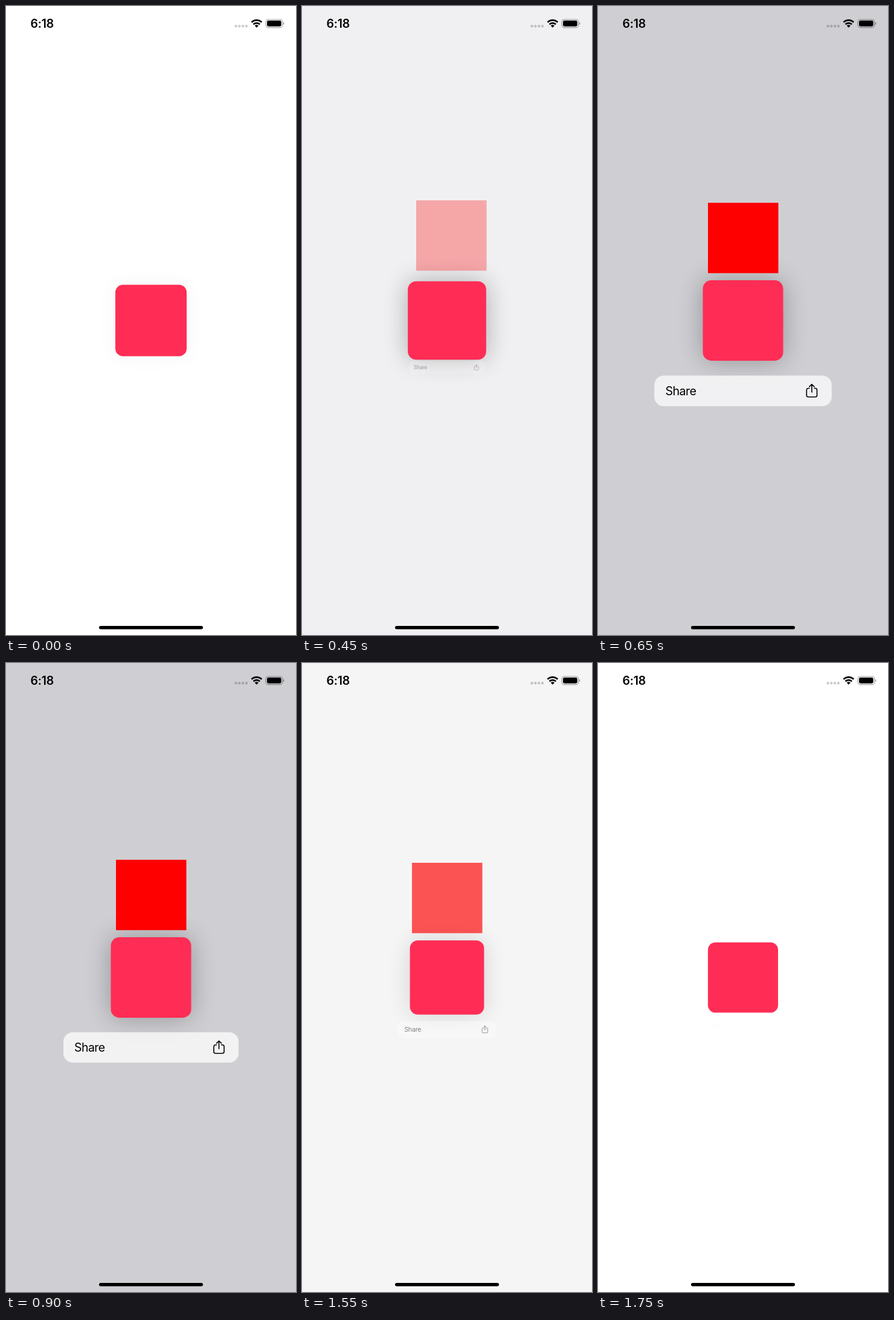
These frames come from a looping animation (480x1039 px, 1900 ms). An HTML page:

```html
<!DOCTYPE html>
<html lang="en">
<head>
<meta charset="utf-8">
<title>Context menu</title>
<style>
  html, body { margin: 0; width: 100%; height: 100%; overflow: hidden; background: #fff; }
  svg { display: block; width: 100%; height: 100%; }
  text { font-family: Inter, Roboto, sans-serif; font-size: 19.5px; }
</style>
</head>
<body>
<svg viewBox="0 0 480 1039">
  <defs>
    <filter id="soft" x="-100%" y="-100%" width="300%" height="300%">
      <feGaussianBlur stdDeviation="18"/>
    </filter>
  </defs>
  <rect width="480" height="1039" fill="#fff"/>
  <rect id="dimmer" width="480" height="1039" fill="#cfcfd3"/>

  <g id="card">
    <rect id="shadow" x="-58" y="-58" width="116" height="116" rx="12.3" filter="url(#soft)"/>
    <rect x="-58" y="-58" width="116" height="116" rx="12.3" fill="#ff2d55"/>
  </g>
  <rect id="preview" x="182" y="325" width="116.5" height="116.3" fill="#f00"/>

  <g id="menu">
    <rect x="-145" y="-25" width="290" height="50" rx="15.5" fill="#fff" fill-opacity=".72"/>
    <text x="-127" y="7" letter-spacing="-.03em">Share</text>
    <g fill="none" stroke="#000" stroke-width="1.6" stroke-linecap="round" stroke-linejoin="round">
      <path d="M108.5-4.2h-1.8a2.7 2.7 0 0 0-2.7 2.7v8.6a2.7 2.7 0 0 0 2.7 2.7h11.6a2.7 2.7 0 0 0 2.7-2.7v-8.6a2.7 2.7 0 0 0-2.7-2.7h-1.8"/>
      <path d="M112.500 2.200v-12.900M108.500-6.800l4-4 4 4"/>
    </g>
  </g>

  <text x="40.600" y="36" font-weight="600" letter-spacing="-.015em">6:18</text>
  <path d="M380.500 33.200h18" stroke="#000" stroke-opacity=".2" stroke-width="4.500" stroke-linecap="round" stroke-dasharray="0 5.800"/>
  <g fill="none" stroke="#000" stroke-width="2.700">
    <path d="M406.400 26.800a12 12 0 0 1 16.800 0"/>
    <path d="M409.500 30.300a7.500 7.500 0 0 1 10.600 0"/>
  </g>
  <path d="M411.700 32.600a4.400 4.400 0 0 1 6.200 0l-3.100 3.100z"/>
  <rect x="430" y="22.200" width="27.600" height="13.400" rx="4" fill="none" stroke="#000" stroke-opacity=".4" stroke-width="1.100"/>
  <rect x="432" y="24.100" width="23.600" height="9.600" rx="2.400"/>
  <path d="M459 26.600a2.600 2.600 0 0 1 0 4.600z" fill-opacity=".45"/>
  <rect x="154" y="1024" width="172" height="5.400" rx="2.700"/>
</svg>
<script>
const LOOP = 1900, STEP = 50, OPEN = 398, CLOSE = 1482;
const REST = 116, LIFTED = 133;

const [dimmer, card, shadow, preview, menu] =
  ["dimmer", "card", "shadow", "preview", "menu"].map(id => document.getElementById(id));
const clamp = v => Math.max(0, Math.min(1, v));

// Underdamped rise from 0 to 1 with a slight overshoot
function spring(ms) {
  const s = Math.max(0, ms) / 1000, decay = 16, freq = 12;
  return 1 - Math.exp(-decay * s) * (Math.cos(freq * s) + decay / freq * Math.sin(freq * s));
}

// Critically damped fall from 1 to 0
function settle(ms, rate) {
  const x = Math.max(0, ms) / 1000 * rate;
  return (1 + x) * Math.exp(-x);
}

function opening(t) {
  const s = spring(t - OPEN);
  const press = 1 - (1 - clamp(t / OPEN)) ** 1.3;
  return {
    size: 118 + 10.2 * press + 4.8 * clamp(s),
    dim: s, fade: s, dx: 10 * (1 - s), dy: -6 * (1 - s),
    scale: .18 + .82 * s, menuAlpha: s
  };
}

function closing(t) {
  const ms = t - CLOSE;
  const dim = settle(ms, 43), fade = clamp(1 - ms / 200);
  return {
    size: REST + (LIFTED - REST) * settle(ms, 30),
    dim, fade, dx: 0, dy: 15 * (1 - fade),
    scale: .44 + .56 * dim, menuAlpha: Math.sqrt(dim)
  };
}

function draw(t) {
  const p = t < CLOSE ? opening(t) : closing(t);
  dimmer.setAttribute("opacity", clamp(p.dim));
  card.setAttribute("transform", `translate(240 519.5) scale(${p.size / REST})`);
  shadow.setAttribute("opacity", .29 * clamp((p.size - REST) / 14));
  preview.setAttribute("transform", `translate(${Math.round(p.dx)} ${Math.round(p.dy)})`);
  preview.setAttribute("opacity", clamp(p.fade));
  menu.setAttribute("transform", `translate(240 ${568 + 67 * p.scale}) scale(${p.scale})`);
  menu.setAttribute("opacity", clamp(p.menuAlpha));
}

const start = performance.now();
function tick() {
  const t = (performance.now() - start) % LOOP;
  draw(Math.floor(t / STEP) * STEP);
  requestAnimationFrame(tick);
}
tick();
</script>
</body>
</html>
```
